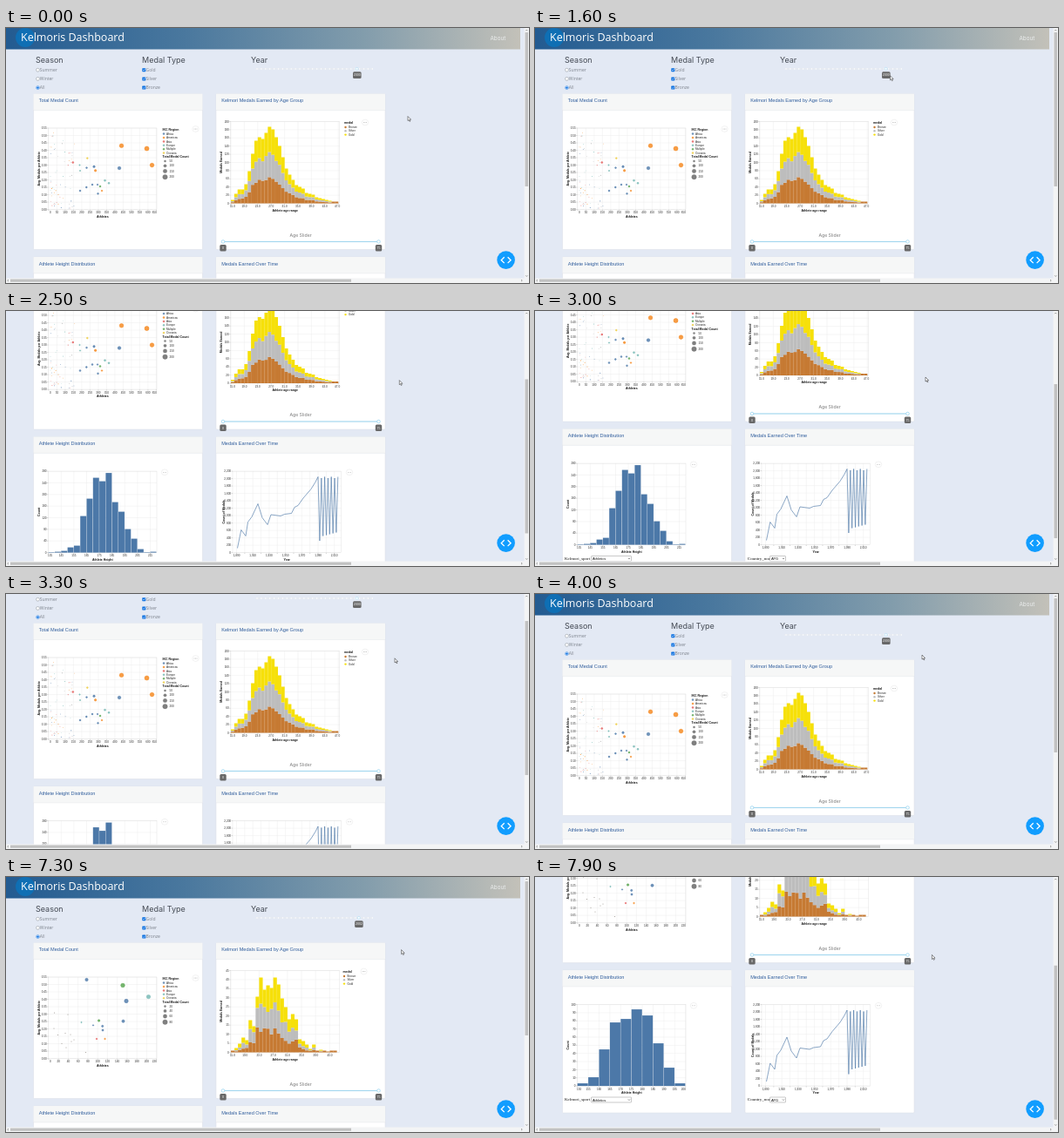
Recreate the animation shown at these times as an HTML page. Size 600 by 293 pixels, loop 8000 ms.

```html
<!DOCTYPE html>
<html lang="en">
<head>
<meta charset="utf-8">
<title>Kelmoris Dashboard</title>
<style>
  html, body { margin: 0; width: 100%; height: 100%; overflow: hidden; background: #e3e9f4; }
  svg { display: block; width: 600px; height: 293px; }
  text { font-family: "Liberation Sans", Arial, sans-serif; }
  .ui { font-family: Inter, sans-serif; }
  .soft { font-family: "Open Sans", sans-serif; }
  .serif { font-family: "Liberation Serif", serif; }
</style>
</head>
<body>
<svg id="stage" viewBox="0 0 600 293">
  <defs>
    <linearGradient id="bar">
      <stop offset="0" stop-color="#235b91"/>
      <stop offset=".35" stop-color="#4a789e"/>
      <stop offset=".7" stop-color="#839dac"/>
      <stop offset="1" stop-color="#c3c1b9"/>
    </linearGradient>
  </defs>
</svg>
<script>
const stage = document.getElementById('stage');
const BLUE = '#4c78a8', ORANGE = '#f58518', RED = '#e45756', TEAL = '#72b7b2', GREEN = '#54a24b', YELLOW = '#eeca3b';
const MEDALS = [['Bronze', '#c67a33'], ['Silver', '#bdbdbd'], ['Gold', '#f6e00a']];
const LOOP = 8000, STEP = 100;

const range = (n, f) => Array.from({ length: n }, (_, i) => f(i));
const thousands = n => n.toLocaleString('en-US');

function el(parent, tag, attrs = {}) {
  const node = document.createElementNS('http://www.w3.org/2000/svg', tag);
  for (const k in attrs) node.setAttribute(k, attrs[k]);
  parent.appendChild(node);
  return node;
}
const group = parent => el(parent, 'g');
const rect = (p, x, y, width, height, fill, more) => el(p, 'rect', { x, y, width, height, fill, ...more });
const dot = (p, cx, cy, r, fill, more) => el(p, 'circle', { cx, cy, r, fill, ...more });
const path = (p, d, stroke, width, more) => el(p, 'path', { d, stroke, 'stroke-width': width, fill: 'none', ...more });
function text(p, x, y, str, size, fill, more) {
  const node = el(p, 'text', { x, y, 'font-size': size, fill, ...more });
  node.textContent = str;
  return node;
}
const mid = { 'text-anchor': 'middle' }, bold = { 'font-weight': 700 };

function random(seed) {
  return () => (seed = (seed * 16807) % 2147483647) / 2147483647;
}

// ---- page furniture ----
rect(stage, 0, 0, 600, 293, '#e3e9f4');
const page = group(stage);

rect(page, 0, 0, 590, 24.5, 'url(#bar)');
dot(page, 22, 11, 11, '#0f6fb4');
text(page, 17, 15, 'Kelmoris Dashboard', 12.5, '#fff', { class: 'soft' });
text(page, 555.5, 14, 'About', 6.3, '#eceeee', { class: 'ui' });

text(page, 34, 39.6, 'Season', 9, '#444a54', { class: 'ui' });
text(page, 156, 39.6, 'Medal Type', 9, '#444a54', { class: 'ui' });
text(page, 281, 39.6, 'Year', 9, '#444a54', { class: 'ui' });

['Summer', 'Winter', 'All'].forEach((s, i) => {
  const y = 48.2 + i * 10.2, on = s === 'All';
  dot(page, 36.5, y, 1.9, '#fff', { stroke: on ? '#0a6fe0' : '#858a92', 'stroke-width': .5 });
  if (on) dot(page, 36.5, y, 1.2, '#0a6fe0');
  text(page, 38.8, y + 1.8, s, 5, '#7d838d', { class: 'soft' });
});
['Gold', 'Silver', 'Bronze'].forEach((s, i) => {
  const y = 48.2 + i * 10.2;
  rect(page, 156.3, y - 2, 4, 4, '#0a6fe0', { rx: .6 });
  path(page, `M157.2 ${y}l.9 .9 1.5-1.8`, '#fff', .6);
  text(page, 160.5, y + 1.8, s, 5, '#7d838d', { class: 'soft' });
});

rect(page, 286, 46.3, 135, 1.2, '#e8ebf1', { rx: .6 });
range(28, i => dot(page, 288 + i * 4.9, 46.9, .75, '#fff'));

function badge(p, x, y, w, str) {
  const g = group(p);
  rect(g, x - w / 2, y, w, 7.6, '#686868', { rx: 1.5 });
  const label = text(g, x, y + 5.1, str, 3.6, '#fff', mid);
  return { g, label };
}
const yearKnob = dot(page, 402.6, 46.9, 1.5, '#fff', { stroke: '#a9def5', 'stroke-width': .6 });
const yearBadge = badge(page, 402.8, 50.3, 9.6, '2000');

function card(x, y, h, title) {
  rect(page, x, y, 194, h, '#fff', { stroke: '#d9dde5', 'stroke-width': .5, rx: 1 });
  rect(page, x + .2, y + .2, 193.6, 18.6, '#f6f7f7');
  path(page, `M${x} ${y + 18.9}h194`, '#dcdfe4', .4);
  text(page, x + 6.2, y + 9.8, title, 5.6, '#2e5c9c');
}
card(31.5, 75.6, 179, 'Total Medal Count');
card(241, 75.6, 179, 'Kelmori Medals Earned by Age Group');
card(31.5, 263, 164, 'Athlete Height Distribution');
card(241, 263, 164, 'Medals Earned Over Time');

text(page, 338, 239.6, 'Age Slider', 5.2, '#777', { class: 'ui', ...mid });
rect(page, 249, 244.9, 178.5, 1.2, '#a5d8ee');
[[249, '0'], [427.5, '75']].forEach(([x, s]) => {
  dot(page, x, 245.5, 1.8, '#fff', { stroke: '#8fd0ee', 'stroke-width': .7 });
  badge(page, x, 249, 7.4, s);
});

// ---- charts ----
function axes(g, x, y, w, h, xt, yt, xName, yName) {
  const bottom = y + h;
  xt.forEach(([px, s]) => {
    path(g, `M${px} ${y}V${bottom}`, '#e4e4e4', .35);
    path(g, `M${px} ${bottom}v1.4`, '#888', .35);
    text(g, Math.min(Math.max(px, x + 2.2), x + w - 2.6), bottom + 4.6, s, 3.1, '#222', mid);
  });
  yt.forEach((s, i) => {
    const py = bottom - h * i / (yt.length - 1);
    path(g, `M${x} ${py}h${w}`, '#e4e4e4', .35);
    path(g, `M${x} ${py}h-1.4`, '#888', .35);
    text(g, x - 1.9, py + 1.1, s, 3.1, '#222', { 'text-anchor': 'end' });
  });
  rect(g, x, y, w, h, 'none', { stroke: '#d6d6d6', 'stroke-width': .35 });
  text(g, x + w / 2, bottom + 9.2, xName, 3.5, '#111', { ...mid, ...bold });
  const nx = x - 9.3, ny = y + h / 2;
  text(g, nx, ny, yName, 3.5, '#111', { ...mid, ...bold, transform: `rotate(-90 ${nx} ${ny})` });
}

function menu(g, x, y) {
  el(g, 'ellipse', { cx: x, cy: y, rx: 3.7, ry: 3.4, fill: '#fff', stroke: '#ddd', 'stroke-width': .4 });
  [-1.5, 0, 1.5].forEach(d => dot(g, x + d, y, .4, '#888'));
}

function scatter(g, { ticks, regions, sizes, points, dust }) {
  const yt = range(12, i => (i * .05).toFixed(2));
  axes(g, 48.7, 115, 124.3, 93.6, ticks, yt, 'Athletes', 'Avg. Medals per Athlete');
  dust(g);
  points.forEach(([x, y, r, c]) => dot(g, x, y, r, c, { 'fill-opacity': .8, stroke: c, 'stroke-width': .5 }));
  text(g, 179.5, 117.6, 'IKC Region', 3.5, '#111', bold);
  regions.forEach(([s, c], i) => {
    const y = 121.6 + i * 4.4;
    dot(g, 181, y, 1, c, { 'fill-opacity': .8, stroke: c, 'stroke-width': .4 });
    text(g, 184, y + 1.1, s, 3.1, '#222');
  });
  const top = 122.6 + regions.length * 4.4;
  text(g, 179.5, top, 'Total Medal Count', 3.5, '#111', bold);
  sizes.forEach((s, i) => {
    const y = top + 4 + i * 5 + i * i * .35;
    dot(g, 182.5, y, 1.1 + i * .55, '#808080', { stroke: '#666', 'stroke-width': .3 });
    text(g, 187.5, y + 1.1, s, 3.1, '#222');
  });
  menu(g, 217.5, 116);
}

function ages(g, { step, years, yt, totals, wobble, legendX }) {
  const w = step / 4, rnd = random(77), base = 201.5;
  axes(g, 257.7, 107.5, 125, 94, range(years, i => [258 + i * step, (15 + 4 * i).toFixed(1)]), yt, 'Athlete age range', 'Medals Earned');
  totals.forEach((h, i) => {
    const bronze = h < 3 ? h : h * (.35 + (rnd() - .5) * wobble);
    const silver = h < 3 ? 0 : h * (.32 + (rnd() - .5) * wobble);
    let y = base;
    [bronze, silver, h - bronze - silver].forEach((part, k) => {
      y -= part;
      if (part > 0) rect(g, 258 + i * w, y, w + .1, part, MEDALS[k][1]);
    });
  });
  text(g, legendX, 109.8, 'medal', 3.5, '#111', bold);
  MEDALS.forEach(([s, c], i) => {
    dot(g, legendX + 1.5, 114 + i * 4.3, 1.2, c);
    text(g, legendX + 5, 115.1 + i * 4.3, s, 3.1, '#222');
  });
  menu(g, legendX + 24, 108.5);
}

function heights(g, xt, yt, bars, w) {
  axes(g, 48.5, 302.6, 124.5, 93.5, xt, yt, 'Athlete Height', 'Count');
  bars.forEach((h, i) => rect(g, 48.7 + i * w, 396.1 - h, w - .35, h, BLUE));
  menu(g, 182, 303.8);
}

const before = group(page), after = group(page);
const regions = [['Africa', BLUE], ['Americas', ORANGE], ['Asia', RED], ['Europe', TEAL], ['Multiple', GREEN], ['Oceania', YELLOW]];

scatter(before, {
  ticks: range(14, i => [48.9 + i * 9.5, i * 50]),
  regions, sizes: [50, 100, 150, 200],
  points: [
    [132.5, 135.3, 2.3, ORANGE], [161.5, 138.5, 2.5, ORANGE], [167.5, 157.6, 2.3, ORANGE],
    [130, 161, 1.8, BLUE], [76.8, 154.5, .9, RED], [84.5, 157.5, .7, TEAL], [93.3, 149.6, .9, YELLOW],
    [101, 159.3, 1.2, BLUE], [92.5, 160.6, .9, BLUE], [102.6, 163.8, 1.2, ORANGE], [85, 164, .7, TEAL],
    [108, 182, .9, GREEN], [92.3, 183, .9, BLUE], [99, 180, .9, BLUE], [113.5, 175.2, 1, TEAL],
    [118, 178.3, 1, TEAL], [110, 187, .8, ORANGE], [85, 187, .9, BLUE], [105.5, 190.3, .9, BLUE], [105, 180, .8, BLUE]
  ],
  dust(g) {
    const rnd = random(421), tints = [TEAL, ORANGE, RED, BLUE, '#999'];
    range(62, i => {
      const x = 51 + 28 * rnd() ** 1.3, y = 207 - 88 * rnd() ** 1.5;
      dot(g, x, y, .35 + .2 * rnd(), tints[i % 5], { 'fill-opacity': .75 });
    });
  }
});
scatter(after, {
  ticks: range(12, i => [48.9 + i * 11.25, i * 20]),
  regions: regions.filter(r => r[0] !== 'Multiple'), sizes: [20, 40, 60, 80],
  points: [
    [92.5, 118, 1.7, BLUE], [134, 124.5, 2.3, GREEN], [163.5, 137.6, 2.2, TEAL], [138, 142.5, 2.2, BLUE],
    [134.5, 165.7, 1.6, BLUE], [106.6, 165, 1.2, GREEN], [110.7, 171.4, 1.1, BLUE], [111, 176, 1.1, BLUE],
    [104, 186, .8, RED], [113.5, 186, .8, ORANGE], [100, 170.4, .7, BLUE], [86.5, 167, .7, TEAL]
  ],
  dust(g) {
    [[55.5, 156], [71, 158], [59.5, 181.5], [68, 179.5], [74, 181], [64, 191.5], [75, 189], [69, 196], [91.5, 201.5], [78, 187], [55, 174]]
      .forEach(([x, y]) => dot(g, x, y, .55, '#a09a94'));
  }
});

ages(before, {
  step: 15.4, years: 9, yt: range(11, i => i * 20), wobble: .05, legendX: 388,
  totals: [4, 11, 16, 16, 22, 37, 57, 72, 76, 74, 81, 88, 85, 76, 66, 53, 40, 33, 27, 21, 19, 17, 12, 11, 10, 7, 6, 5, 4, 3, 2, 2]
});
ages(after, {
  step: 16.2, years: 8, yt: range(10, i => i * 5), wobble: .2, legendX: 386.5,
  totals: [2, 5, 10, 17, 14, 37, 30, 64, 86, 72, 77, 74, 86, 78, 62, 52, 38, 44, 38, 15, 13, 9, 4, 9, 2, 3, 2, 1, 2, 2]
});

heights(before, range(9, i => [48.7 + i * 14.6, 135 + i * 10]), range(8, i => i * 40),
  [.5, 1, 2, 6, 8, 42, 62, 86, 82, 91.5, 58, 47, 27, 16, 4, .5, 1], 7.3);
heights(after, range(11, i => [48.7 + i * 12.4, 150 + i * 5]), range(11, i => i * 10),
  [3, 10, 42, 73, 77, 88, 81, 49, 21, 3], 12.4);

const medals = group(page);
axes(medals, 260, 302.6, 124.5, 93.5, range(13, i => [264.5 + i * 9.35, i % 2 ? '' : thousands(1890 + i * 10)]),
  range(12, i => thousands(i * 200)), 'Year', 'Count of Medals');
const trend = [[265.5, 391], [269.8, 370], [275, 377], [277.5, 361], [282, 355], [289, 340], [294, 356], [300, 364], [304, 352.5],
  [315, 354], [319.5, 352], [327.5, 351], [331, 344], [335, 342], [341, 333.5], [350, 323], [355, 315], [358, 309]];
range(6, i => {
  const x = 358 + i * 3.8;
  trend.push([x + 1.9, (i ? 378 : 382.5) - i], [x + 3.8, 309 + (i % 2 ? 0 : 1.5)]);
});
path(medals, 'M' + trend.join('L'), BLUE, .65, { 'stroke-linejoin': 'round' });
menu(medals, 394, 303.8);

function picker(x, label, boxX, w, value) {
  text(page, x, 413.3, label, 5, '#111', { class: 'serif' });
  rect(page, boxX, 409, w, 6, '#fff', { stroke: '#777', 'stroke-width': .4, rx: .6 });
  text(page, boxX + 1.4, 413.5, value, 4.1, '#111');
  path(page, `M${boxX + w - 3.6} 411.4l1.1 1.2 1.1-1.2`, '#333', .5);
}
picker(34, 'Kelmori_sport', 64.5, 46, 'Athletics');
picker(243.8, 'Country_noc', 269.5, 18, 'AFG');

// ---- loading spinners ----
const loading = group(page);
const spinners = [[128.5, 175.8, '#2fa84f'], [338, 168.4, '#ffb31a']].map(([x, y, c]) => ({
  x, y, node: path(loading, 'M3.1-3.1A4.4 4.4 0 1 0 3.1 3.1', c, 1.25)
}));

// ---- fixed overlay ----
rect(stage, 594.5, 0, 5.5, 293, '#f3f4f5');
rect(stage, 0, 287.5, 600, 5.5, '#f3f4f5');
const thumb = rect(stage, 595.5, 5, 3.6, 177, '#c1c1c1');
rect(stage, 5, 288.6, 391, 3.2, '#c1c1c1');
path(stage, 'M596.2 3.2l1.1-1.2 1.1 1.2M596.2 284.3l1.1 1.2 1.1-1.2M2.9 289.1l-1.2 1.1 1.2 1.1M591 289.1l1.2 1.1-1.2 1.1', '#666', .6);

dot(stage, 573.6, 266.6, 10.3, '#119dff');
path(stage, 'M571.7 263.3l-3.5 3.4 3.5 3.4M575.6 263.3l3.5 3.4-3.5 3.4', '#fff', 1.3);

const cursor = path(stage, 'M0 0V5.1L1.2 4 2 5.9 2.9 5.5 2.1 3.7H3.6Z', '#222', .5, { fill: '#fff' });

// ---- timeline ----
const scrollKeys = [[1800, 0], [2500, 118.5], [2700, 156], [2900, 156], [3300, 42], [3500, 31], [3700, 31], [4000, 0], [7500, 0], [7900, 156]];
const cursorKeys = [[0, 461, 101.5], [300, 459, 99], [500, 459, 99], [700, 453, 93], [900, 453, 93], [1600, 407.5, 54.8], [1800, 407.5, 54.8],
  [2100, 449, 79], [2500, 451.3, 79.6], [3300, 446, 73.8], [4000, 444, 70], [4300, 410, 50], [4600, 405, 47], [5000, 453, 76.5],
  [5500, 453.6, 77.2], [6900, 453.6, 79], [7300, 453.6, 83.6], [7500, 453.6, 83.6], [7900, 455.4, 89.4]];

function at(keys, t, col) {
  const i = keys.findIndex(k => k[0] > t);
  if (i === 0) return keys[0][col];
  if (i < 0) return keys[keys.length - 1][col];
  const a = keys[i - 1], b = keys[i];
  return a[col] + (b[col] - a[col]) * (t - a[0]) / (b[0] - a[0]);
}
const show = (node, on) => node.setAttribute('visibility', on ? 'visible' : 'hidden');

function draw(now) {
  const t = Math.floor(now % LOOP / STEP) * STEP;
  const top = at(scrollKeys, t, 1), moved = t >= 4600;
  page.setAttribute('transform', `translate(0 ${-top})`);
  thumb.setAttribute('y', 5 + top * .62);
  cursor.setAttribute('transform', `translate(${at(cursorKeys, t, 1)} ${at(cursorKeys, t, 2)})`);
  yearKnob.setAttribute('cx', moved ? 404.8 : 402.6);
  yearBadge.g.setAttribute('transform', `translate(${moved ? 2.1 : 0} 0)`);
  yearBadge.label.textContent = moved ? '2002' : '2000';
  show(before, t < 4700);
  show(loading, t >= 4700 && t < 6500);
  show(after, t >= 6500);
  const turn = (t - 5500) / 750 * 360;
  spinners.forEach(s => s.node.setAttribute('transform', `translate(${s.x} ${s.y}) rotate(${turn})`));
}

const start = performance.now();
(function tick() {
  draw(performance.now() - start);
  requestAnimationFrame(tick);
})();
</script>
</body>
</html>
```
